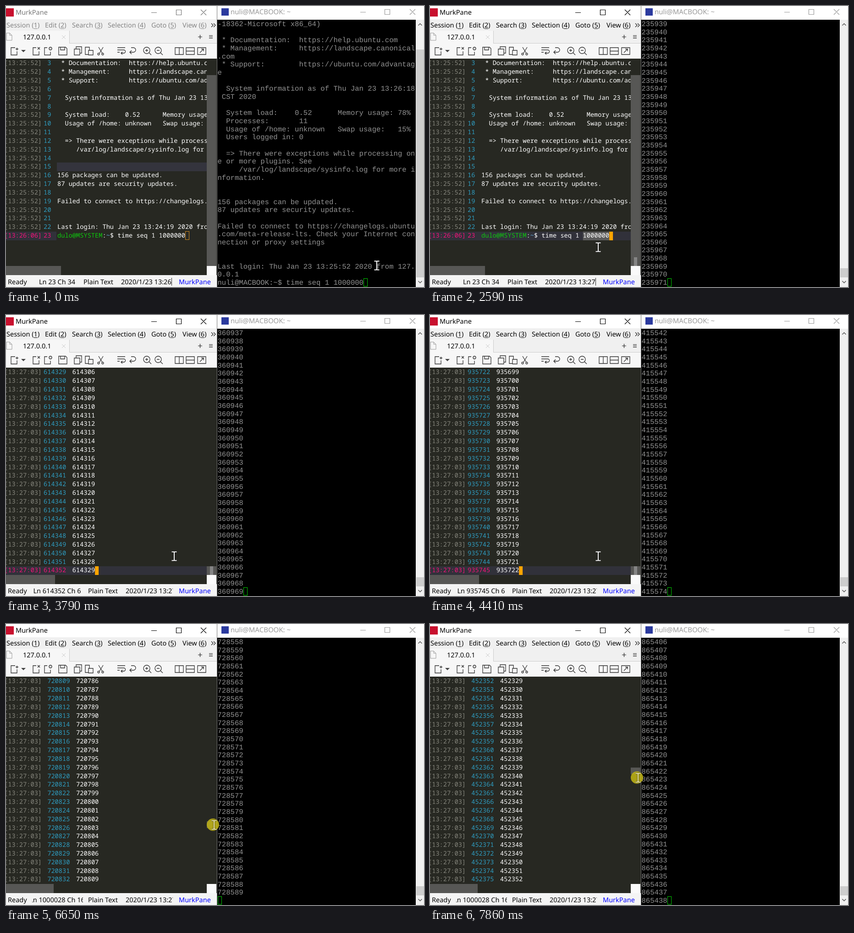
An HTML page with a canvas that plays this animation: 912 by 614 pixels, repeating every 8 s.

```html
<!DOCTYPE html>
<html lang="en">
<head>
<meta charset="utf-8">
<title>Terminal race</title>
<style>
html, body { margin: 0; width: 100%; height: 100%; overflow: hidden; background: #000; }
canvas { display: block; width: 912px; height: 614px; }
</style>
</head>
<body>
<canvas id="stage" width="912" height="614"></canvas>
<script>
const ctx = document.getElementById('stage').getContext('2d');
const LOOP = 8000;
const UI = '"Noto Sans", "Open Sans", sans-serif';
const CODE = '13.68px "Noto Sans Mono", "DejaVu Sans Mono", monospace';
const SHELL = '15.62px "Liberation Mono", monospace';
const ROW_L = 18.83, COL_L = 8.21, ROW_R = 17.66, COL_R = 9.375, BASE_L = 129.4, BASE_R = 44;
const INK = '#222', BACK = '#272822', LINE = '#31313a', THUMB = '#575755', ORANGE = '#ffa500';
const WHITE = '#fff', PINK = '#f5137a';
const APP = 'MurkPane', USER_L = 'dulo', USER_R = 'nuli';
const COMMAND = 'time seq 1 1000000';

// The picture is refreshed in even steps inside each of these spans: start, end, count.
const TICKS = [[0, 0, 1], [200, 1150, 6], [1360, 1360, 1], [1550, 2390, 5], [2590, 2590, 1],
  [2770, 3590, 5], [3790, 3790, 1], [4010, 4830, 5], [5030, 6030, 6], [6250, 6650, 3],
  [6870, 7260, 3], [7460, 7860, 3]]
  .flatMap(([a, b, n]) => Array.from({ length: n }, (_, i) => n > 1 ? a + (b - a) * i / (n - 1) : a));

// Key tables: time, then values.
const RIGHT_COUNT = [[710, 0], [1360, 83492], [2590, 235971], [3790, 360969],
  [5230, 545982], [6650, 728590], [7860, 865438]];
const LEFT_COUNT = [[2970, 0], [3790, 614329], [4300, 1000000]];
const LEFT_TOP = [[6250, 1000005], [6650, 720809], [7860, 452352]];
const MOUSE = [[720, 809, 567], [1150, 367, 527], [4930, 367, 527], [5230, 424, 553],
  [5430, 450, 558], [6150, 452, 557], [6250, 454, 549], [6650, 454, 439], [7860, 454, 336]];
const RIGHT_FOCUS = 390, LEFT_FOCUS = 1760, MINUTE = 1550, RUN = 2970, DONE = 4300, DRAG = 6250;

const INTRO_R = `-18362-Microsoft x86_64)

 * Documentation:  https://help.ubuntu.com
 * Management:     https://landscape.canonical
.com
 * Support:        https://ubuntu.com/advantag
e

  System information as of Thu Jan 23 13:26:18
 CST 2020

  System load:    0.52      Memory usage: 78%
  Processes:       11
  Usage of /home: unknown   Swap usage:   15%
  Users logged in: 0

  => There were exceptions while processing on
e or more plugins. See
     /var/log/landscape/sysinfo.log for more i
nformation.


156 packages can be updated.
87 updates are security updates.

Failed to connect to https://changelogs.ubuntu
.com/meta-release-lts. Check your Internet con
nection or proxy settings


Last login: Thu Jan 23 13:25:52 2020 from 127.
0.0.1
${USER_R}@MACBOOK:~$ ${COMMAND}`.split('\n');

const INTRO_L = ` * Documentation:  https://help.ubuntu.com
 * Management:     https://landscape.canonical.com
 * Support:        https://ubuntu.com/advantage

  System information as of Thu Jan 23 13:24:20

  System load:    0.52      Memory usage: 78%
  Usage of /home: unknown   Swap usage:   15%

  => There were exceptions while processing
     /var/log/landscape/sysinfo.log for more


156 packages can be updated.
87 updates are security updates.

Failed to connect to https://changelogs.ubuntu.com


Last login: Thu Jan 23 13:24:19 2020 from`.split('\n');

const MENU = [[1, 'Session'], [85, 'Edit'], [144, 'Search'], [222, 'Selection'], [317, 'Goto'], [385, 'View']];
const TOOLS = new Path2D([
  'M20 91H11V107H24V99M21 94H27M24 91V97',
  'M66 91H59V107H72V99M69 90L74 95M74 90L69 95',
  'M90 91H84V107H97V100M94 93a3 3 0 1 0 6 0a3 3 0 1 0-6 0',
  'M115 90H130L133 93V107H115ZM119 90V96H128V90',
  'M149 94H161V107H149ZM153 94V89H165V103H161',
  'M182 97V90H173V106H180M180 97H190V107H180Z',
  'M202 90L210 103M212 90L204 103M200 105a2 2 0 1 0 4 0a2 2 0 1 0-4 0M209 105a2 2 0 1 0 4 0a2 2 0 1 0-4 0',
  'M243 91H260M243 96H257a3.5 3.5 0 0 1 0 7H251M254 100L251 103L254 106M243 101H248',
  'M273 91H278a5 5 0 0 1 0 10H270M274 97L270 101L274 105',
  'M300 97a7 7 0 1 0 14 0a7 7 0 1 0-14 0M312 102L317 107M304 97H310M307 94V100',
  'M325 97a7 7 0 1 0 14 0a7 7 0 1 0-14 0M337 102L342 107M329 97H335',
  'M369 91H387V106H369ZM378 91V106',
  'M393 91H411V106H393ZM393 98.5H411',
  'M418 91H436V106H418ZM423 102L431 94M426 94H431V99'].join(''));

function at(keys, t) {
  const next = keys.findIndex(k => k[0] > t);
  if (next === 0) return keys[0].slice(1);
  if (next < 0) return keys.at(-1).slice(1);
  const a = keys[next - 1], b = keys[next], p = (t - a[0]) / (b[0] - a[0]);
  return a.slice(1).map((v, i) => v + (b[i + 1] - v) * p);
}

function box(x, y, x2, y2, color) {
  ctx.fillStyle = color;
  ctx.fillRect(x, y, x2 - x, y2 - y);
}

function frame(x, y, w, h, color) {
  ctx.strokeStyle = color;
  ctx.lineWidth = 1;
  ctx.strokeRect(x + .5, y + .5, w, h);
}

function text(s, x, y, color, font) {
  if (font) ctx.font = font;
  ctx.fillStyle = color;
  ctx.fillText(s, x, y);
}

function stroke(path, color, width = 1.2) {
  ctx.strokeStyle = color;
  ctx.lineWidth = width;
  ctx.stroke(typeof path === 'string' ? new Path2D(path) : path);
}

function clipped(x, y, x2, y2, paint) {
  ctx.save();
  ctx.beginPath();
  ctx.rect(x, y, x2 - x, y2 - y);
  ctx.clip();
  paint();
  ctx.restore();
}

function windowButtons(min, max, close, y, color) {
  stroke(`M${min - 6} ${y + .5}h12M${max - 5.5} ${y - 5.5}h11v11h-11z` +
    `M${close - 6} ${y - 6}l12 12m0-12l-12 12`, color);
}

function chrome(active) {
  const ink = active ? '#000' : '#858585';
  box(0, 0, 460, 29, WHITE);
  box(0, 29, 460, 115, '#f0f0f0');
  box(0, 5, 17, 23, '#c8102e');
  text(APP, 21, 19, active ? '#000' : '#777', '14.5px ' + UI);
  windowButtons(323, 377, 431, 14, active ? '#000' : '#777');
  MENU.forEach(([x, name], i) => {
    const head = name + ' (', dx = ctx.measureText(head).width;
    text(`${head}${i + 1})`, x, 47, ink);
    box(x + dx, 49, x + dx + 8, 50, ink);
  });
  stroke('M448 38l4 4l-4 4M453 38l4 4l-4 4', INK);
  box(0, 54, 138, 82, '#f7f7f7');
  box(138, 54, 139, 82, '#ccc');
  box(139, 81, 460, 82, '#ccc');
  box(0, 82, 460, 115, '#f7f7f7');
  stroke('M1 59H8L13 64V75H1ZM8 59V64H13', '#999', 1);
  text('127.0.0.1', 37, 73, '#000');
  stroke('M122 64l8 8m0-8l-8 8', '#ccc', 1);
  stroke('M419 67.5h9M423.5 63v9M443 64.5h8M443 67.5h8M443 70.5h8', INK);
  stroke(TOOLS, '#333', 1.3);
  ctx.fillStyle = '#444';
  ctx.fill(new Path2D('M33 96H43L38 101Z'));
}

function prompt(x, y) {
  const parts = [[USER_L + '@MSYSTEM', '#0ec80e'], [':', WHITE], ['~', '#66b0e0'], ['$ ', WHITE]];
  for (const [s, color] of parts) {
    text(s, x, y, color);
    x += s.length * COL_L;
  }
  return x;
}

function editorRow(i, line, digits, { stamp = '13:27:03', current = false, value = '' }) {
  const y = BASE_L + i * ROW_L, number = String(line);
  text(`[${stamp}]`, -4, y, current ? PINK : '#85857c');
  text(number, 82 + (digits - number.length) * COL_L, y, current ? PINK : '#2f9cc0');
  text(value, 82 + digits * COL_L + 13.6, y, WHITE);
}

function rowBand(i, x, x2, color) {
  const y = Math.round(116 + i * ROW_L);
  box(x, y, x2, y + 19, color);
}

function introLeft(focused) {
  const y = BASE_L + 20 * ROW_L, argX = 112 + 27 * COL_L, endX = 112 + 34 * COL_L;
  if (!focused) rowBand(12, 111, 438, '#34343d');
  rowBand(20, 0, focused ? 438 : 110, LINE);
  if (focused) rowBand(20, argX, endX, '#5b5b5b');
  INTRO_L.forEach((value, i) => editorRow(i, i + 3, 2, { stamp: '13:25:52', value }));
  editorRow(20, 23, 2, { stamp: '13:26:06', current: true });
  text(COMMAND, prompt(112, y), y, WHITE);
  if (focused) rowBand(20, endX, endX + 8, ORANGE);
  else frame(391, 492, 8, 18, '#d08a20');
}

function seqLeft(t) {
  const count = Math.round(at(LEFT_COUNT, t)[0]), last = t >= DONE ? 1000028 : count + 23;
  const top = t >= DRAG ? Math.round(at(LEFT_TOP, t)[0]) : last - 23;
  const digits = String(last).length, textX = 82 + digits * COL_L + 13.6;
  const tail = { 1000025: 'real    0m1.333s', 1000026: 'user    0m0.047s', 1000027: 'sys     0m0.969s' };
  for (let i = 0; i < 24; i++) {
    const line = top + i, current = line === last;
    const value = line <= 1000023 ? String(line - 23) : tail[line] || '';
    if (current) rowBand(i, 0, 438, LINE);
    editorRow(i, line, digits, { current, value });
    if (!current) continue;
    const x = t >= DONE ? prompt(textX, BASE_L + i * ROW_L) : textX + value.length * COL_L;
    rowBand(i, x, x + 8, ORANGE);
  }
  return { last, top, column: t >= DONE ? 16 : String(count).length };
}

function leftWindow(t) {
  const focused = t >= LEFT_FOCUS, running = t >= RUN;
  let seq;
  chrome(focused);
  box(0, 115, 460, 588, BACK);
  ctx.font = CODE;
  clipped(0, 115, 438, 568, () => running ? seq = seqLeft(t) : introLeft(focused));

  if (!running) {
    box(438, 151, 459, 568, THUMB);
    if (focused) box(445, 549, 452, 568, '#858585');
  } else if (t < DONE) {
    box(438, 549, 459, 568, THUMB);
    box(445, 549, 452, 568, '#858585');
  } else {
    const y = 116 + 437 * seq.top / 1000005;
    box(438, y, 459, y + 15, THUMB);
  }
  box(0, 568, !running ? 120 : t < DONE ? 107 : 104, 588, THUMB);
  box(438, 568, 459, 588, '#fafafa');

  box(0, 588, 460, 614, '#f4f4f4');
  text('Ready', 4, 608, '#000', '14.5px ' + UI);
  const place = running ? `Ln ${seq.last} Ch ${seq.column}` : 'Ln 23 Ch 34';
  clipped(57, 588, 168, 614, () => {
    text(place, 111.5 - ctx.measureText(place).width / 2, 608, '#000');
  });
  text('Plain Text', running ? 179 : 169, 608, '#000');
  const clock = '2020/1/23 13:' + (t >= MINUTE ? '27' : '26');
  clipped(250, 588, 364, 614, () => text(clock, running ? 261 : 251, 608, '#000'));
  if (!running) box(361, 594, 362, 611, '#222');
  text(APP, 377, 608, '#0000ff');
}

function rightWindow(t) {
  const active = t >= RIGHT_FOCUS && t < LEFT_FOCUS, ink = active ? '#000' : '#999';
  const started = t > RIGHT_COUNT[0][0];
  box(460, 0, 461, 614, '#777');
  box(461, 0, 912, 30, WHITE);
  box(470, 5, 486, 21, '#2b3a9e');
  text(USER_R + '@MACBOOK: ~', 490, 18, ink, '15px ' + UI);
  windowButtons(779, 832, 887, 13, ink);
  box(461, 30, 894, 614, '#000');
  box(894, 30, 912, 614, '#f0f0f0');
  box(895, started ? 573 : 95, 912, 593, '#cdcdcd');
  stroke('M899.5 42.5l4-4l4 4M899.5 601l4 4l4-4', '#555', 1.5);

  let rows = INTRO_R;
  if (started) {
    const count = Math.round(at(RIGHT_COUNT, t)[0]);
    const shown = count < 1e5 ? 4 : [0, 2].includes(count % 5) ? 0 : 6;
    rows = Array.from({ length: 33 }, (_, i) => String(count - 32 + i));
    rows[32] = rows[32].slice(0, shown);
  }
  ctx.font = SHELL;
  rows.forEach((row, i) => text(row, 461.5, BASE_R + i * ROW_R, '#929292'));
  const x = Math.round(461.5 + rows[32].length * COL_R);
  if (active) box(x, 595, x + 9, 613, '#00ff00');
  else frame(x, 595, 8, 17, '#00c800');
}

function pointer(t) {
  const [x, y] = at(MOUSE, t);
  if (t >= DRAG) {
    ctx.fillStyle = 'rgba(190, 178, 20, .88)';
    ctx.beginPath();
    ctx.arc(x - 2.5, y - .5, 13.5, 0, 7);
    ctx.fill();
  }
  const beam = `M${x - 5.5} ${y - 9.5}h4.5l1 1l1-1h4.5M${x} ${y - 9}v18M${x - 5.5} ${y + 9.5}h4.5l1-1l1 1h4.5`;
  stroke(beam, 'rgba(0, 0, 0, .7)', 3.5);
  stroke(beam, t >= DRAG ? '#fff8b0' : WHITE, 2);
}

function draw(now) {
  const t = TICKS.findLast(tick => tick <= now % LOOP);
  ctx.textRendering = 'geometricPrecision';
  leftWindow(t);
  rightWindow(t);
  pointer(t);
}

function loop() {
  draw(performance.now());
  requestAnimationFrame(loop);
}
loop();
</script>
</body>
</html>
```
